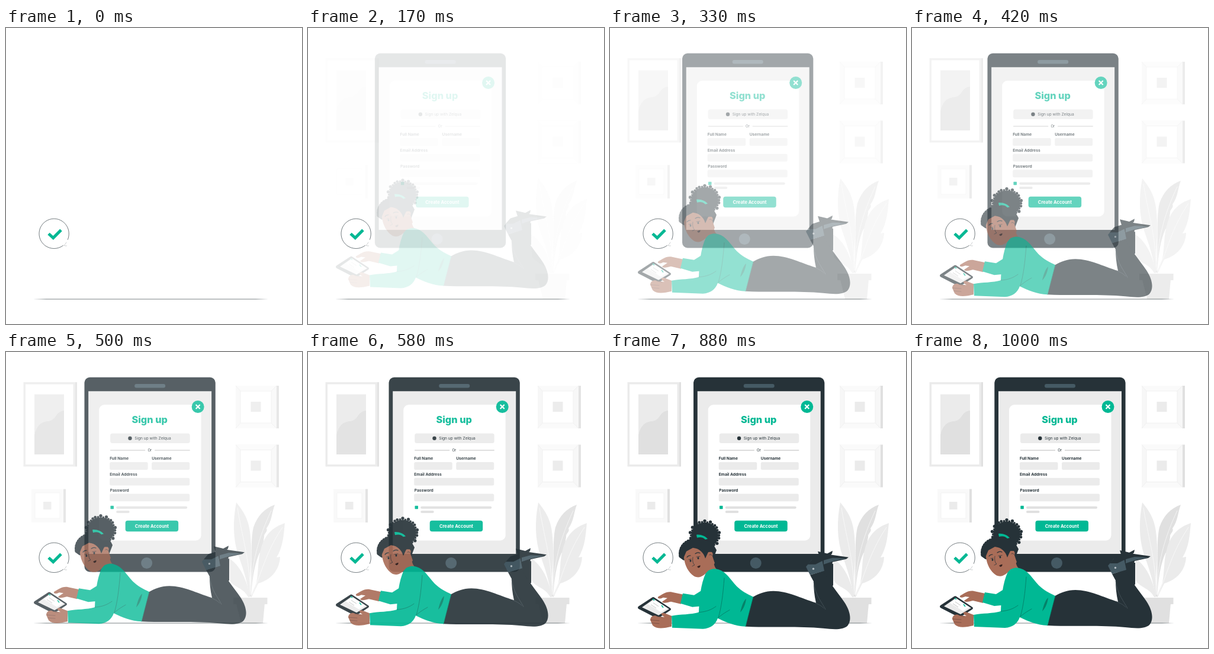
An HTML page that plays this animation: 500x500 px, repeating every 1040 ms.

```html
<!DOCTYPE html>
<html lang="en">
<head>
<meta charset="utf-8">
<title>Sign up</title>
<style>
  html, body { margin: 0; width: 100%; height: 100%; overflow: hidden; background: #fff; }
  svg { display: block; width: 100vw; height: 100vh; }
  text { font-family: Inter, "Open Sans", sans-serif; fill: #263238; }
  .label { font-size: 6.7px; font-weight: 700; }
  .dark { fill: #263238; }
  .slate { fill: #455a64; }
  .green { fill: #00b894; }
  .skin { fill: #a96d58; }
  .grey { fill: #ebebeb; }
  .shade { fill: #e0e0e0; }
  .white { fill: #fff; }
  .line { fill: none; stroke: #263238; stroke-width: .7; stroke-linecap: round; stroke-linejoin: round; }
</style>
</head>
<body>
<svg viewBox="0 0 500 500">
  <defs>
    <g id="square-frame">
      <path class="shade" d="M69 0H73V72H69Z"/>
      <path fill="#f7f7f7" d="M0 0H69V72H0Z"/>
      <path fill="#fafafa" d="M0 0H69L60 9H8ZM0 72L8 63H60L69 72Z"/>
      <path fill="none" stroke="#ebebeb" stroke-width=".7" d="M0 0L8 9M69 0L60 9M0 72L8 63M69 72L60 63"/>
      <path fill="#fff" stroke="#ebebeb" stroke-width=".7" d="M8 9H60V63H8Z"/>
      <path class="grey" d="M25.5 27H42.5V44H25.5Z"/>
    </g>
  </defs>

  <g id="room">
    <path class="shade" d="M116.5 51H120V193.5H116.5Z"/>
    <path class="grey" d="M29.5 51H117V193.5H29.5Z"/>
    <path class="white" d="M33 54.5H113.5V190H33Z"/>
    <path class="grey" d="M48 71.5H98V173H48Z"/>
    <path class="shade" d="M48 141C51 125 59 118 70 117C86 116 82 101 98 99V173H48Z"/>

    <path class="shade" d="M97 231.5H101V288H97Z"/>
    <path fill="#f9f9f9" d="M43 231.5H97V288H43Z"/>
    <path fill="#fff" stroke="#f0f0f0" stroke-width=".7" d="M49 238H91V281H49Z"/>
    <path class="grey" d="M63 253H76.5V266H63Z"/>

    <use href="#square-frame" x="388" y="57"/>
    <use href="#square-frame" x="388" y="156.5"/>

    <path class="grey" d="M389 254C383 285 383 317 393 345C400 365 407 384 411 413H413C410 380 417 349 413 312C411 284 402 270 389 254Z"/>
    <path class="shade" d="M454 258C437 264 425 276 418 296C412 321 417 361 412 413H414C416 382 420 358 428 340C437 330 433 325 436 313C435 306 443 304 440 298C449 286 449 271 454 258Z"/>
    <path class="grey" d="M471 289C450 296 437 309 431 331C425 350 427 367 423 390L413 414H415L426 391C447 385 462 369 463 346L457 347C468 329 469 310 471 289Z"/>
    <path class="grey" d="M377 349C390 356 406 377 412 414H409C401 398 385 398 378 386Z"/>
    <path fill="none" stroke="#fff" stroke-width=".6" d="M391 263C397 305 412 350 413 410M448 268C426 315 414 358 414 410M467 296C438 340 433 370 416 410"/>
    <path class="shade" d="M389 425H437L434 458H397ZM384 415H441.500V426H384Z"/>
  </g>

  <path class="dark" opacity=".6" d="M46 458L68 457.600H422L443 458L422 458.400H68Z"/>

  <g id="device">
    <rect class="dark" x="139.300" y="42.800" width="221.300" height="328.600" rx="9"/>
    <path class="grey" d="M146 66.300H354V341H146Z"/>
    <rect class="slate" x="224" y="54" width="52" height="6.500" rx="3.200"/>
    <circle class="slate" cx="244.500" cy="356.500" r="9.500"/>
    <rect class="white" x="164" y="89" width="172.500" height="229.500" rx="9"/>
    <circle class="green" cx="331" cy="92.500" r="10.500"/>
    <path stroke="#fff" stroke-width="2.200" d="M327.500 89L334.500 96M334.500 89L327.500 96"/>
    <text x="249.500" y="119.500" font-size="16.300" font-weight="800" text-anchor="middle" style="fill:#00b894">Sign up</text>
    <rect class="grey" x="183" y="137.500" width="134.500" height="16.500" rx="3.500"/>
    <circle class="dark" cx="216.300" cy="145.800" r="3.200"/>
    <text x="224" y="148" font-size="6.600">Sign up with Zelqua</text>
    <path stroke="#a6a6a6" stroke-width=".8" d="M183 166H242M258 166H317.500"/>
    <text x="249.700" y="168.200" font-size="6" text-anchor="middle">Or</text>
    <text class="label" x="182" y="181.500">Full Name</text>
    <text class="label" x="253" y="181.500">Username</text>
    <text class="label" x="182" y="209.300">Email Address</text>
    <text class="label" x="182.500" y="236">Password</text>
    <g class="grey">
      <rect x="182" y="186" width="64.500" height="13" rx="2.500"/>
      <rect x="253" y="186" width="64" height="13" rx="2.500"/>
      <rect x="182" y="212.800" width="135" height="12.700" rx="2.500"/>
      <rect x="182" y="239.500" width="135" height="12.700" rx="2.500"/>
    </g>
    <rect class="green" x="183.300" y="259.700" width="5.500" height="5.500" rx=".7"/>
    <rect class="shade" x="193" y="260.700" width="120" height="4" rx="2"/>
    <rect class="shade" x="193" y="268" width="22.500" height="4" rx="2"/>
    <rect class="green" x="208.500" y="284.700" width="89.500" height="18.500" rx="4"/>
    <text x="253.300" y="296.500" font-size="7.500" font-weight="700" text-anchor="middle" style="fill:#fff">Create Account</text>
  </g>

  <g id="person">
    <!-- far leg and shoe -->
    <path class="dark" d="M360 356L377 356V392L366 410L350 402Z"/>
    <path class="dark" d="M351 335L364 338L375 341L403 345L399 348L376 353L375 358L358 357Z"/>
    <path class="slate" d="M361 350L376 346L399 347L376 352L361 357Z"/>
    <!-- near leg -->
    <path class="dark" d="M240 413C252 406 262 402 276 402C300 402 322 414 348 422C345 409 344 397 344 386L338 375L360 368C369 386 385 405 396 421C406 436 409 452 401 461C393 468 378 467 360 465C319 461 272 464 229 462Z"/>
    <path class="line" style="stroke:#4c5a61" d="M344 387C347 410 358 421 364 433M346 422C351 424 356 426 361 431"/>
    <path class="slate" d="M331 361L341 349L358 348L362 368L338 375Z"/>
    <path class="dark" d="M334 357L342 348L361 342L376 334L375 339L361 350L347 357Z"/>
    <circle cx="343.500" cy="364.500" r="1.700" fill="#b5bfc4"/>
    <!-- far arm -->
    <path class="skin" d="M124 408L105 404C95 402 88 408 81 412C80 415 84 416 90 413L97 414L88 420C90 424 98 421 103 420L120 424Z"/>
    <path class="green" d="M123 406L142 409L158 399L160 427L139 429L119 423Z"/>
    <!-- handheld screen -->
    <path class="dark" d="M48 428L71 413Q73 411.500 75 413L102 431Q104 432.500 102 434.500L83 447Q80 449 77 447L48 432Q46 430 48 428Z"/>
    <path class="grey" d="M54 429.500L74 415.500L100 432.500L82 443Z"/>
    <path class="white" d="M64 424L75 416.500L97 431L86 437.500Z"/>
    <path stroke="#00b894" stroke-width="1.600" d="M72 415.500L75 418M87 426L90 430"/>
    <path stroke="#aaa" stroke-width=".7" d="M73 422L82 428M69 425L78 431"/>
    <!-- torso -->
    <path class="skin" d="M157 354L175 350C175 357 177 363 181 366L164 382Z"/>
    <path class="green" d="M162 371C167 365 176 363 183 365.500C196 369 203 382 214 394C222 402 232 407 242 412L229 462C211 461 196 455 182 448C178 459 170 465 157 466L105 464L104 444C120 441 136 442 150 438C151 414 153 391 162 371Z"/>
    <path class="line" style="stroke:#066f5c" d="M193 380C191 407 188 431 183 447M183 447C191 440 197 437 202 434M150 438C164 437 172 433 179 428M242 412L229 462"/>
    <path fill="#058269" d="M220 438C222 429 225 419 230 415C229 423 226 432 220 438Z"/>
    <!-- near hand -->
    <path class="skin" d="M104 444L91 439C84 439 87 443 92 446L80 445C73 441 68 446 68 451L72 460C79 467 91 465 104 462Z"/>
    <path class="line" style="stroke:#70483f" d="M69 451L83 452M71 456L83 457M79 445L88 447"/>
    <!-- head -->
    <g id="curls" class="dark"></g>
    <path class="dark" d="M117 345C114 329 123 317 139 315C157 307 174 319 180 333L172 354L124 350Z"/>
    <path class="skin" d="M138 326C128 327 122 334 125 347C127 360 132 370 142 377C152 382 160 375 166 367L177 355L173 343C176 336 168 332 164 339L161 343C161 334 149 326 138 326Z"/>
    <path class="dark" d="M137 319C123 323 118 332 123 349L129 335L140 329C151 330 158 337 161 347L166 336L175 336L177 323L160 315Z"/>
    <path class="green" d="M146 307C153 306 161 309 165 314L161 315C156 310 151 311 147 312Z"/>
    <path class="line" style="stroke-width:1.200" d="M130 345Q132 342 136 342M144 339Q148 336 152 338"/>
    <ellipse class="dark" cx="136" cy="351" rx="1.400" ry="1.900"/>
    <ellipse class="dark" cx="149" cy="346.500" rx="1.400" ry="1.900"/>
    <path class="line" d="M133 349L137 348M146 344.500L152 343.500M140 345C139 350 140 356 143 358L139 360M168 341Q171 339 172 342"/>
    <path fill="#35211f" d="M147 361L149.500 359.500L152.500 358.500Q153 362 149.500 363Z"/>
  </g>

  <path class="line" style="stroke-width:.65" d="M96.500 367.400A25.200 25.200 0 1 1 104.300 357.400"/>
  <path class="line" style="stroke-width:.5" opacity=".45" d="M102 362Q100.500 365.500 98 367.200Q100 368.300 102.500 368"/>
  <path fill="none" stroke="#00b894" stroke-width="5" d="M72 347.500L79.800 354.500L93 341.200"/>
</svg>
<script>
  const LOOP = 1040, FPS = 24, SLIDE = 30, LEAD = 0.015;
  const [room, device, person, curls] =
    ["room", "device", "person", "curls"].map(id => document.getElementById(id));

  // Curly bun: a solid core with an uneven ring of small curls
  const dot = (x, y, r) => `<circle cx="${x}" cy="${y}" r="${r}"/>`;
  let hair = `<ellipse cx="160" cy="308" rx="23" ry="22"/>`;
  for (let i = 0; i < 32; i++) {
    const a = i * Math.PI / 16, wobble = Math.sin(i * 2.7);
    hair += dot(160 + (24 + wobble) * Math.cos(a), 308 + (23.5 + wobble) * Math.sin(a), 2.2 + wobble * 0.5);
  }
  for (let i = 0; i < 12; i++) {
    const a = Math.PI * (0.95 + i / 17);
    hair += dot(142 + 23 * Math.cos(a), 339 + 23 * Math.sin(a), 3);
  }
  curls.innerHTML = hair;

  const bezier = (a, b, s) => 3 * (1 - s) ** 2 * s * a + 3 * (1 - s) * s * s * b + s ** 3;

  // Ease with a small overshoot near the end
  function ease(x) {
    let low = 0, high = 1;
    for (let i = 0; i < 24; i++) {
      const mid = (low + high) / 2;
      if (bezier(0.36, 0.5, mid) < x) low = mid; else high = mid;
    }
    return bezier(-0.01, 1.38, low);
  }

  function render(ms) {
    const step = Math.floor((ms % LOOP + 4.9) * FPS / 1000);
    const progress = step < 2 ? 0 : ease(Math.min(1, step / FPS + LEAD));
    const offset = -SLIDE * (1 - progress);
    for (const part of [room, device, person]) {
      part.setAttribute("opacity", Math.min(1, Math.max(0, progress)));
    }
    device.setAttribute("transform", `translate(${offset} 0)`);
    person.setAttribute("transform", `translate(0 ${offset})`);
  }

  const start = performance.now();
  function tick() {
    render(performance.now() - start);
    requestAnimationFrame(tick);
  }
  tick();
</script>
</body>
</html>
```
